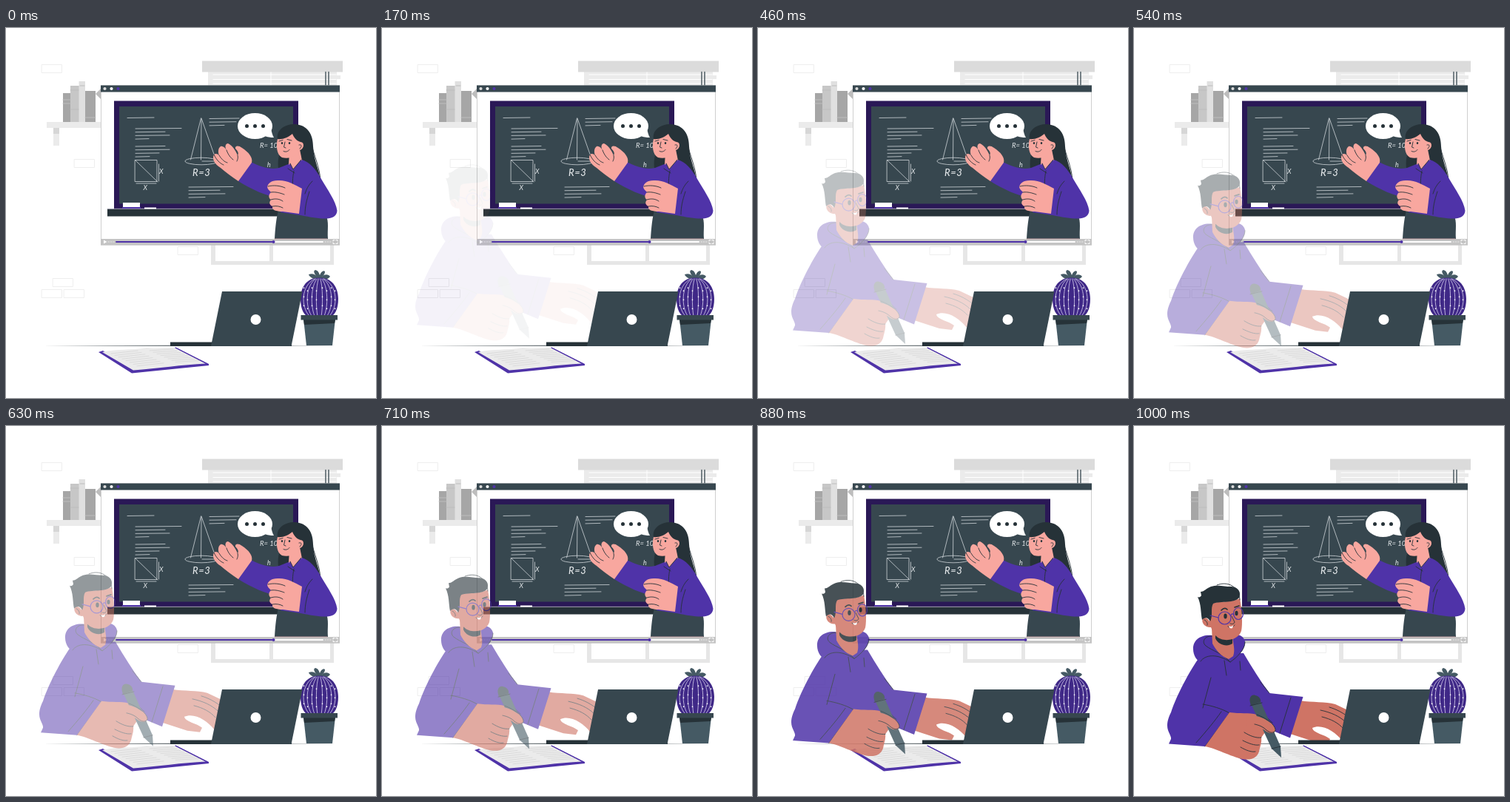
Write an HTML page that moves like this. It is 500 px wide and 500 px high and loops after 1.04 s.

```html
<!DOCTYPE html>
<html lang="en">
<head>
<meta charset="utf-8">
<title>Online lesson</title>
<style>
  html, body { margin: 0; width: 100%; height: 100%; overflow: hidden; background: #fff; }
  svg { display: block; width: 100vw; height: 100vh; }
  path { stroke-linecap: round; stroke-linejoin: round; }
  .dark { fill: #263238; }
  .slate { fill: #37474f; }
  .violet { fill: #4f33a8; }
  .pink { fill: #f8a79f; }
  .tan { fill: #cf7465; }
  .ink { fill: none; stroke: #263238; stroke-width: .9; }
  .brow { stroke-width: 1.7; }
  .chalk { fill: none; stroke: #cfd5d8; stroke-width: .8; }
  text { font-family: Lato, "Open Sans", sans-serif; font-style: italic; fill: #e4e8ea; }
</style>
</head>
<body>
<svg viewBox="0 0 500 500">
  <!-- room -->
  <path id="bricks" fill="none" stroke="#ececec" stroke-width=".9"/>
  <path fill="#ebebeb" d="M55 127H130V135H72V159H64V135H55Z"/>
  <path fill="#d6d6d6" d="M64 135H72V143H64Z"/>
  <path fill="#a6a6a6" d="M77 88H87V127H77ZM107 85H121V127H107Z"/>
  <path fill="#c7c7c7" d="M87 78H99V127H87Z"/>
  <path fill="#e0e0e0" d="M98.500 72H107V127H98.500Z"/>
  <path fill="none" stroke="#bdbdbd" d="M77 97H87M77 102H87M87 84H98M87 110H98M100 78H106M107 121H121"/>
  <path fill="#bdbdbd" d="M121 89L129 81V97Z"/>
  <path fill="#ebebeb" d="M273 59H447V64H452V69H447V78H273Z"/>
  <path fill="none" stroke="#fff" d="M280 63H446M280 69.500H446M280 75H446M358 59V77"/>
  <path fill="#dbdbdb" d="M265 44.500H455V59.500H265Z"/>
  <path stroke="#37474f" stroke-width="1.300" d="M432 59.500V77M436 59.500V77"/>
  <path fill="#e6e6e6" fill-rule="evenodd" d="M277 292H443V320H277ZM283 292V315H356V292ZM361 292V315H438V292Z"/>

  <!-- player window -->
  <rect x="128.500" y="78" width="322" height="215" fill="#fff" stroke="#cfcfcf"/>
  <rect class="slate" x="128" y="77.500" width="323" height="9"/>
  <circle cx="133.500" cy="82" r="2.100" fill="#dcdcdc"/>
  <circle cx="142.500" cy="82" r="2.100" fill="#fff"/>
  <circle class="violet" cx="151.500" cy="82" r="2.100"/>

  <!-- blackboard -->
  <rect x="146" y="98.500" width="249" height="146" fill="#2a1856"/>
  <rect class="slate" x="153" y="106" width="235" height="131.500"/>
  <rect class="dark" x="137" y="244.500" width="231" height="10"/>
  <path stroke="#b9b4c8" stroke-width=".7" d="M137 244.300H368"/>
  <path class="violet" d="M157 242H182V244H157Z"/>
  <path fill="#fff" d="M158 236H181V242H158ZM187 242.500H203V244.500H187Z"/>
  <path id="notes" class="chalk"/>
  <path class="chalk" stroke-width=".7" d="M174.500 178.500H204V207.500H174.500ZM174.500 178.500L205 208M206.500 184V207M176 210H203"/>
  <path class="chalk" d="M263.500 122L249.500 178M264 122L284 179M264 123L263.500 178M265 180H284"/>
  <ellipse class="chalk" cx="264" cy="180" rx="22" ry="4.800" stroke-width="1.200"/>
  <text x="207" y="197" font-size="9">X</text>
  <text x="185.500" y="219" font-size="9">X</text>
  <text x="252" y="200" font-size="13" font-weight="500" letter-spacing=".5">R=3</text>
  <text x="343" y="162" font-size="9.500">R= 10</text>
  <text x="353" y="188" font-size="9">h</text>

  <!-- teacher -->
  <path class="dark" d="M367 150C365 138 376 130 390 130C408 131 415 144 415 160C416 180 424 192 425 208L374 205C366 195 367 180 369 172Z"/>
  <path class="ink" d="M412 154C416 172 424 188 425 206"/>
  <path class="slate" d="M369 242C365 257 364 270 363 285H435C434 272 437 262 432 252Z"/>
  <path class="violet" d="M384 183L400 178C410 181 419 191 426 204C434 218 446 234 447.500 247C446 261 428 259 398 253L371 249L372 231C352 227 331 218 314 207L331 181C345 188 357 192 369 189Z"/>
  <path class="pink" d="M383 168L397 164L400 179L388 192L382 184Z"/>
  <path class="pink" d="M367 150C365 157 365 171 373 175C384 178 394 172 397 165C403 164 404 154 398 154C394 153 390 150 387 143C381 148 374 151 367 150Z"/>
  <path class="violet" d="M384 183L388 191L399 178L402 184L390 196L380 189Z"/>
  <path class="ink" d="M384 183L388 191L399 178M390 196L381 190M389 193C387 204 387 210 388 219M414 207C408 213 406 218 404 224M410 221C406 233 404 242 404 252"/>
  <path class="ink" d="M369 153L374 151.500M380 150.500L386 152M377 154L375.500 161L378 162M375 166.500C378 168 381 167 383 164.500M396 158C400 157 400 160 397 163"/>
  <ellipse class="dark" cx="373" cy="155.500" rx="1.200" ry="1.600"/>
  <ellipse class="dark" cx="383" cy="155.500" rx="1.200" ry="1.600"/>
  <path class="pink" d="M314 207C305 201 297 195 290 189C282 184 278 177 281 171C283 169 286 170 288 172C286 167 287 162 290 160C293 159 296 162 298 165C295 160 297 156 300 156C306 159 310 165 313 172C315 169 313 166 310 163C309 159 314 158 319 162C328 168 334 175 332 182Z"/>
  <path class="ink" d="M281 171C284 178 289 183 294 185M288 172C291 177 295 181 299 182M298 165C300 171 304 176 307 178M313 172C314 175 313 178 312 180"/>
  <path class="pink" d="M400 217C389 211 379 205 367 206C358 206 354 210 353 215C354 219 357 220 358 222C354 226 355 230 358 232C355 236 356 239 360 241C359 246 365 248 374 248L396 251Z"/>
  <path class="ink" d="M354 214C361 212 371 213 377 216M358 222C364 221 371 223 376 225M358 232C364 230 370 231 374 234M360 241C366 240 370 241 374 243"/>

  <!-- speech bubble -->
  <path fill="#fff" d="M350 146C355 148 360 148 362 148C360 145 359 140 358 136Z"/>
  <ellipse cx="336.500" cy="132.500" rx="23.500" ry="17.500" fill="#fff"/>
  <circle class="dark" cx="325.500" cy="132.500" r="2.500"/>
  <circle class="dark" cx="336.500" cy="132.500" r="2.500"/>
  <circle class="dark" cx="347.500" cy="132.500" r="2.500"/>

  <!-- player controls -->
  <rect x="128" y="285" width="323" height="8.500" fill="#c4c4c4"/>
  <path stroke="#c9a5a8" d="M363 285H434"/>
  <path fill="#fff" d="M132 286.500L136.500 289L132 291.500Z"/>
  <path stroke="#e8e8e8" stroke-dasharray="1.500 1.800" d="M138 289H146M431 289H439"/>
  <path stroke="#fff" stroke-width="2" d="M363 289H428"/>
  <path stroke="#4f33a8" stroke-width="1.800" d="M149 289H361"/>
  <circle class="violet" cx="361.500" cy="289" r="2"/>
  <path fill="none" stroke="#fff" d="M442 288V286.500H444M446 286.500H448V288M448 290V291.500H446M444 291.500H442V290"/>

  <!-- desk -->
  <path class="dark" d="M50 429.300L248 428.800L447 429.300L248 429.800Z"/>
  <path class="violet" d="M125 438L131 436L172 461L230 432L274 454V456L170 466.500Z"/>
  <path fill="#ebebeb" d="M130 438C150 433 170 436 190 432C204 434 218 431 229 432.500L270 453.500C238 455 205 460 172 462.500Z"/>
  <path stroke="#4f33a8" stroke-width="1.300" d="M229 432L273 454.500"/>
  <path id="writing" fill="none" stroke="#d0d0d0" stroke-width=".6"/>

  <!-- cactus -->
  <path fill="#455a64" d="M423 341C417 340 410 337 409 333C414 331 418 333 420 336C416 331 415 328 418 327C422 328 423 331 424 334C426 329 429 327 431 329C431 333 428 335 427 336C431 332 436 333 438 336C435 340 429 341 423 341Z"/>
  <path fill="#3f2887" d="M423.500 337.500C440 337 449 350 449 366C449 380 444 390 437 390H410C403 390 398 380 398 366C398 350 407 337 423.500 337.500Z"/>
  <path id="ribs" fill="none" stroke="#c9c0e5" stroke-width=".9"/>
  <path id="spines" fill="none" stroke="#fff" stroke-width="1.500"/>
  <path fill="#455a64" d="M402 393H445L441 429H406Z"/>
  <path class="dark" d="M402 394H445L444 399L403 401Z"/>
  <path class="slate" d="M398.500 388H448V394.500H398.500Z"/>

  <!-- student -->
  <g id="student">
    <path class="tan" d="M224 371C242 374 258 372 272 376L291 385V425H281C272 413 254 402 241 408C242 415 258 417 265 423L262 429L245 427L208 415Z"/>
    <path class="ink" d="M252 384C266 387 278 392 287 401M254 393C266 396 276 401 283 409M264 380C274 383 281 387 288 392"/>
    <path class="violet" d="M92 308C80 322 58 362 50 387C46 395 45 400 45 405C45 413 51 419 50 423L47 429.500L96 433L160 402L183 410L211 421.500L228.500 366L183 361C171 345 160 327 148 307Z"/>
    <path class="ink" d="M212 367L197 415M104 340L93 381M118 386C109 399 98 412 84 428M93 376C105 378 119 382 129 388L96 433M171 376C173 385 179 395 187 401M183 361L171 346"/>
    <path class="violet" d="M106 283C91 281 79 289 80 302C80 310 86 319 90 318C99 308 115 311 129 319C139 314 151 302 150 291C148 284 143 282 135 281Z"/>
    <path class="ink" d="M90 318C96 309 112 307 130 319C140 312 150 302 150 292M106 284C95 283 91 292 97 297C106 304 120 307 130 319M122 317L125 337M143 318L144 330"/>
    <path class="tan" d="M105 272L133 284C134 295 137 302 134 311L128 315C117 311 110 302 106 294Z"/>
    <path class="tan" d="M104 240C117 236 132 239 143 233C146 249 147 268 145 277C140 291 120 293 109 284L104 272C97 273 90 266 93 260C96 258 100 260 102 264Z"/>
    <path class="dark" d="M110 283C117 290 126 290 133 288L133 294C126 299 114 296 110 287Z"/>
    <path class="dark" d="M103 264C100 258 96 258 92 262C90 252 91 241 86 231C88 232 90 231 91 229L90 224C95 224 98 219 104 217C113 214 123 217 130 217C142 217 145 226 142 232C136 240 118 236 107 240C103 246 107 256 103 264Z"/>
    <path class="ink" d="M112 215C127 209 142 217 143 235M95 262C98 263 100 267 99 269M132 257L136 265C135 268 132 268 130 267M127 271C130 273 134 272 136 269"/>
    <path class="ink brow" d="M118 249C121 246 124 246 126 248M136 245L142 243"/>
    <path fill="#fff" d="M128 270.500C131 271.500 133 271 134.500 269L133 273C131 274 129 273 128 270.500Z"/>
    <ellipse class="dark" cx="123.500" cy="257" rx="2.200" ry="3.400"/>
    <ellipse class="dark" cx="138.500" cy="253" rx="2.100" ry="3.200"/>
    <g fill="none" stroke="#4f33a8" stroke-width="1.200">
      <circle cx="122.500" cy="259.500" r="8.500"/>
      <ellipse cx="141" cy="253.500" rx="6.500" ry="8"/>
      <path d="M103 256L114 259M130.500 257C131 254 133 253 135 255"/>
    </g>
    <path class="tan" d="M129 387C143 389 155 387 166 390C179 395 192 404 191 412C187 416 183 414 179 411L172 421C173 428 170 434 169 440C166 449 158 452 146 450C132 447 109 435 96 433Z"/>
    <path fill="#455a64" d="M157 373L170 370L198 433L199 448L186 436Z"/>
    <path class="slate" d="M157 374C155 367 159 362 164 364C169 365 172 369 171 373L158 378Z"/>
    <path class="ink" d="M157 378L173 374M186 436L198 433"/>
    <path class="tan" d="M152 393C166 387 189 401 191 410C191 416 184 416 179 413C172 407 163 405 153 405Z"/>
    <path class="ink" d="M166 390C179 395 192 404 191 412C187 416 183 414 179 411C174 406 168 404 163 403M149 414C157 419 165 422 172 421M147 425C155 429 163 432 169 431M144 434C151 438 158 441 164 440"/>
  </g>

  <!-- laptop -->
  <path class="dark" d="M222 424.500H280L386 428V430H222Z"/>
  <path class="slate" d="M292 356H400.500L385.500 430H277Z"/>
  <circle cx="337.500" cy="394" r="7" fill="#fff"/>
</svg>
<script>
const LOOP = 1040, FRAMES = 25, DROP = 30;
const byId = id => document.getElementById(id);
const draw = (id, parts) => byId(id).setAttribute('d', parts.join(''));

draw('bricks', [[48, 49], [92, 177], [232, 295], [63, 338], [48, 353], [78, 353]]
  .map(([x, y]) => `M${x + .5} ${y + .5}h27v11h-27z`));

// Chalk paragraphs: left, top, line widths
const paragraphs = [
  [164, 121.5, 36], [175, 136, 62, 40, 46, 18], [175, 160, 40, 46, 32, 19],
  [275, 122.5, 40, 36, 20], [247, 215, 60, 42, 49, 22]
];
draw('notes', paragraphs.flatMap(([x, y, ...widths]) =>
  widths.map((w, i) => `M${x} ${y + i * 4.7}l${w} -.5`)));

const rows = [...Array(8).keys()];
draw('writing', rows.flatMap(i => [
  `M${142 + i * 5} ${440 + i * 2.4}l36 -4`,
  `M${194 + i * 5} ${436 + i * 2.2}l32 -2`
]));

const middle = 423.5, ribs = [-21, -16, -10, -4, 4, 10, 16, 21];
draw('ribs', ribs.map(x =>
  `M${middle + x * .3} 339C${middle + x * 1.2} 348 ${middle + x * 1.2} 377 ${middle + x * .65} 389`));
draw('spines', ribs.flatMap((x, i) => [351, 363, 375].map(y => `M${middle + x} ${y + i % 2 * 4}v.5`)));

// Ease-in, the curve of cubic-bezier(.42, 0, 1, 1)
function easeIn(x) {
  let low = 0, high = 1;
  for (let i = 0; i < 24; i++) {
    const s = (low + high) / 2, r = 1 - s;
    if (1.26 * r * r * s + 3 * r * s * s + s ** 3 < x) low = s; else high = s;
  }
  return low * low * (3 - 2 * low);
}

const student = byId('student');
const start = performance.now();
function render() {
  const time = (performance.now() - start) % LOOP;
  const frame = Math.min(FRAMES - 1, Math.floor((time + 4) / LOOP * FRAMES));
  const p = frame ? easeIn(Math.min(1, (frame + .7) / (FRAMES - 1))) : 0;
  student.style.opacity = p;
  student.setAttribute('transform', `translate(0 ${DROP * (p - 1)})`);
  requestAnimationFrame(render);
}
render();
</script>
</body>
</html>
```
